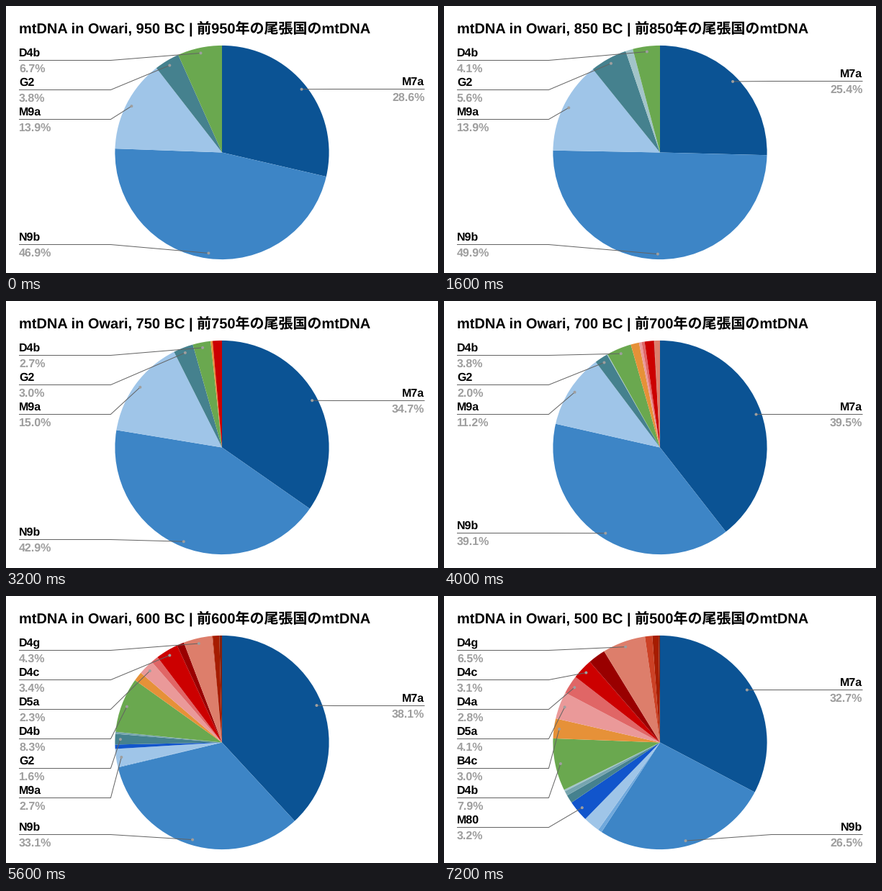
These frames come from a looping animation (600x371 px, 8000 ms). A matplotlib script:

```python
import math

import matplotlib.pyplot as plt
from matplotlib.animation import FuncAnimation
from matplotlib.patches import Circle, Wedge

W, H, DPI = 600, 371, 100
PX = 72 / DPI                       # points per pixel
CX, CY, R = 300, 203.5, 148.6
DOT_R = 0.95 * R
LEFT, RIGHT = 18, 581.5
ELBOW = R + 6
TOP, BOTTOM, STEP = 75.5, 331.5, 41

plt.rcParams["text.hinting"] = "none"
FONTS = ["Liberation Sans", "Noto Sans CJK JP"]

# Slices in clockwise order from the top
COLORS = dict(
    M7a="#0b5394", N9b="#3d85c6", N9a="#6fa8dc", M9a="#9fc5e8", M80="#1155cc",
    G2="#45818e", G1="#76a5af", G3="#a2c4c9", D4b="#6aa84f", B4c="#e69138",
    D5a="#ea9999", D4a="#e06666", D4c="#cc0000", D4e="#990000", D4g="#dd7e6b",
    D4h="#cc4125", D4j="#a61c00", D4m="#85200c",
)

SHARES = {
    950: dict(M7a=28.6, N9b=46.9, M9a=13.9, G2=3.8, D4b=6.7),
    850: dict(M7a=25.4, N9b=49.9, M9a=13.9, G2=5.6, G3=1.1, D4b=4.1),
    750: dict(M7a=34.7, N9b=42.9, M9a=15.0, G2=3.0, D4b=2.7, B4c=0.3, D4c=1.4),
    650: dict(M7a=44.2, N9b=35.3, M9a=7.4, G2=1.0, G3=0.2, D4b=4.8, B4c=2.2,
              D5a=0.8, D4a=0.9, D4c=1.4, D4e=0.1, D4g=1.7),
    600: dict(M7a=38.1, N9b=33.1, N9a=0.1, M9a=2.7, M80=0.65, G2=1.6, G1=0.3,
              D4b=8.3, B4c=1.4, D5a=2.3, D4a=1.1, D4c=3.4, D4e=1.1, D4g=4.3,
              D4h=0.1, D4j=1.0, D4m=0.4),
    550: dict(M7a=39.8, N9b=25.9, M9a=4.7, M80=1.05, G2=0.95, G3=0.15, D4b=7.2,
              B4c=2.1, D5a=5.6, D4a=1.5, D4c=3.4, D4e=1.0, D4g=6.1, D4h=0.2,
              D4j=0.25, D4m=0.1),
    500: dict(M7a=32.7, N9b=26.5, N9a=0.6, M9a=2.5, M80=3.2, G2=1.25, G1=0.7,
              G3=0.25, D4b=7.9, B4c=3.0, D5a=4.1, D4a=2.8, D4c=3.1, D4e=2.65,
              D4g=6.5, D4h=1.1, D4j=0.95, D4m=0.2),
}
LABEL_COUNT = {600: 8, 550: 8, 500: 9}


def shares_for(year):
    """Shares of a year; years without data lie halfway between neighbours."""
    if year in SHARES:
        return SHARES[year]
    a, b = SHARES[year + 50], SHARES[year - 50]
    return {k: (a.get(k, 0) + b.get(k, 0)) / 2 for k in COLORS if k in a or k in b}


fig = plt.figure(figsize=(W / DPI, H / DPI), dpi=DPI, facecolor="white")
ax = fig.add_axes([0, 0, 1, 1])


def text(x, y, s, size, color, ha="left"):
    ax.text(x, y, s, fontsize=size * PX, color=color, ha=ha, va="baseline",
            family=FONTS, weight="bold")


def draw_label(name, share, dot, y, side):
    edge, ha = (LEFT, "left") if side < 0 else (RIGHT, "right")
    xs, ys = [edge, CX + side * ELBOW, dot[0]], [y, y, dot[1]]
    ax.plot(xs, ys, color="#636363", lw=PX, snap=False, zorder=2,
            solid_capstyle="butt")
    ax.add_patch(Circle(dot, 2, fc="#9e9e9e", lw=0, zorder=3))
    text(edge, y - 5.5, name, 16, "black", ha)
    text(edge, y + 16.5, f"{share:.1f}%", 16, "#9e9e9e", ha)


def draw(i):
    ax.clear()
    ax.set(xlim=(0, W), ylim=(H, 0))
    ax.axis("off")
    year = 950 - 50 * i
    text(18.5, 38, f"mtDNA in Owari, {year} BC | 前{year}年の尾張国のmtDNA", 20, "black")

    shares = shares_for(year)
    total = sum(shares.values())
    biggest = sorted(shares, key=shares.get, reverse=True)[:LABEL_COUNT.get(year, 5)]
    sides = {-1: [], 1: []}
    start = -90
    for name, share in shares.items():
        end = start + 360 * share / total
        ax.add_patch(Wedge((CX, CY), R, start, end, fc=COLORS[name], lw=0))
        if name in biggest:
            mid = math.radians((start + end) / 2)
            dot = CX + DOT_R * math.cos(mid), CY + DOT_R * math.sin(mid)
            sides[1 if dot[0] > CX else -1].append((dot[1], dot, name))
        start = end

    # Stack the labels downwards, keeping them apart
    for side, items in sides.items():
        free = TOP
        for dot_y, dot, name in sorted(items):
            y = max(free, min(math.floor(dot_y) + 0.5, BOTTOM))
            draw_label(name, shares[name], dot, y, side)
            free = y + STEP


anim = FuncAnimation(fig, draw, frames=10, interval=800, init_func=lambda: None,
                     repeat=True, repeat_delay=0, blit=False)
plt.show()
```
